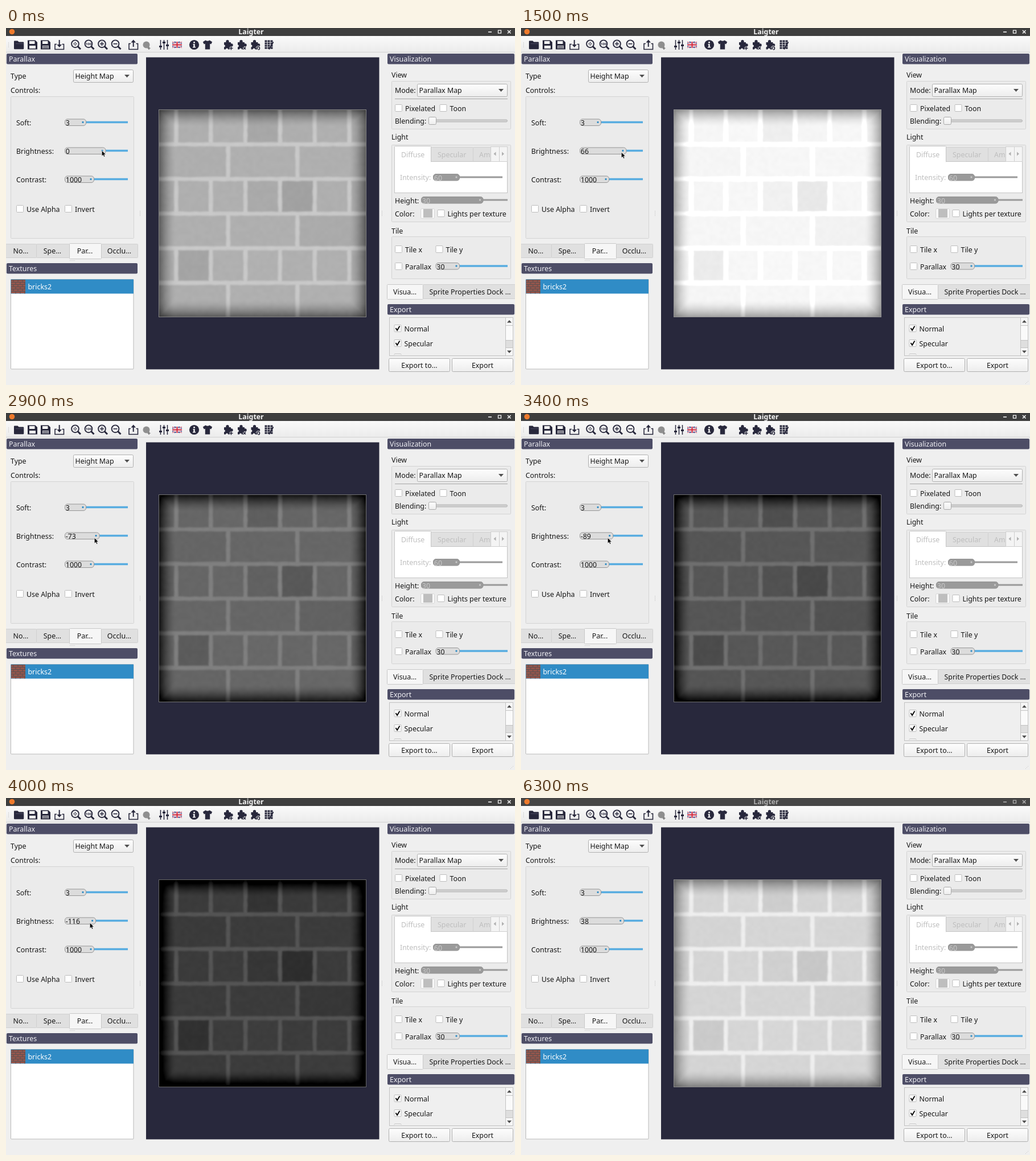
These frames come from a looping animation (894x627 px, 6.4 s). An HTML page with a canvas:

```html
<!DOCTYPE html>
<html lang="en">
<head>
<meta charset="utf-8">
<title>Laigter</title>
<style>
  html, body { margin: 0; width: 894px; height: 627px; overflow: hidden; background: #efefef; }
  body { position: relative; }
  svg, canvas { position: absolute; left: 0; top: 0; display: block; }
  #map { left: 268px; top: 143px; }
  text { font: 12.4px "Noto Sans", "Open Sans", sans-serif; white-space: pre; }
  .mid { text-anchor: middle; }
  .bold { font-weight: 700; }
  .tiny { font-size: 6px; }
</style>
</head>
<body>
<svg id="ui" width="894" height="627" viewBox="0 0 894 627"></svg>
<canvas id="map" width="365" height="365"></canvas>
<svg width="894" height="627" viewBox="0 0 894 627">
  <path id="cursor" d="M.3 .3V10L2.6 7.9L4.2 11.3L5.9 10.5L4.3 7.2H7.4Z" fill="#000" stroke="#fff" stroke-width=".6"/>
</svg>
<script>
const INK = '#28283c', TEXT = '#161616', BLUE = '#57ace0', GREY = '#9a9a9a', FADED = '#bebebe';
const out = [];
const add = s => out.push(s);

// Basic shapes, boxes given by their edges
const box = (x1, y1, x2, y2, fill, stroke, r = 0, extra = '') => {
  const k = stroke ? .5 : 0;
  add(`<rect x="${x1 + k}" y="${y1 + k}" width="${x2 - x1 - 2 * k}" height="${y2 - y1 - 2 * k}" rx="${r}" fill="${fill}" stroke="${stroke || 'none'}" ${extra}/>`);
};
const text = (x, y, s, fill = TEXT, extra = '') =>
  add(`<text x="${x}" y="${y}" fill="${fill}" ${extra}>${s}</text>`);
const mid = (x, y, s) => text(x, y, s, TEXT, 'class="mid"');
const fill = (d, c = INK) => add(`<path d="${d}" fill="${c}" fill-rule="evenodd"/>`);
const line = (d, c = INK, w = 1) => add(`<path d="${d}" fill="none" stroke="${c}" stroke-width="${w}"/>`);
const disc = (x, y, r, c = INK) => add(`<circle cx="${x}" cy="${y}" r="${r}" fill="${c}"/>`);

// Widgets
const dock = (x1, y1, x2, s) => {
  box(x1, y1, x2, y1 + 18.5, '#4d4d66', '', 2);
  text(x1 + 4, y1 + 14, s, '#f0f0f4');
};
const frame = (x1, y1, x2, y2) => box(x1, y1, x2, y2, '#ebebeb', '#d3d3d3', 1);
const combo = (x1, y1, x2, s) => {
  box(x1, y1, x2, y1 + 23, 'url(#btn)', '#b0b0b0', 2);
  text(x1 + 3.5, y1 + 16, s);
  fill(`M${x2 - 16} ${y1 + 9}h9l-4.5 5z`, '#505050');
};
const check = (x, y, s, on) => {
  box(x, y, x + 13, y + 13, '#fff', '#bdbdbd', 1);
  if (on) line(`M${x + 3} ${y + 6}l2.6 3.8L${x + 10} ${y + 2.5}`, '#111', 2);
  text(x + 18, y + 12, s);
};
const slider = (x1, xh, x2, y, s, off, id = '') => {
  line(`M${x1 + 8} ${y}H${x2}`, off ? GREY : BLUE, off ? 3 : 3.6);
  add(`<rect ${id && `id="${id}Grip"`} x="${x1 + .5}" y="${y - 5.5}" width="${xh - x1 - 1}" height="11.5" rx="4.5" fill="${off ? GREY : '#dcdcdc'}" stroke="${off ? '#919191' : '#969696'}"/>`);
  add(`<rect ${id && `id="${id}Dot"`} x="${xh - 7.5}" y="${y - 1.5}" width="3" height="3" rx="1" fill="${off ? '#c8c8c8' : '#2f8bc4'}"/>`);
  text(x1 + 1.8, y + 5.5, s, off ? '#c8c8c8' : TEXT, id && `id="${id}Text"`);
};
const tab = (x1, y1, x2, y2, on) => box(x1, y1, x2, y2, on ? '#f6f6f6' : '#e0e0e0', on ? '#c8c8c8' : '#d0d0d0', 1);
const button = (x1, x2, s) => {
  box(x1, 580, x2, 604, 'url(#btn)', '#b0b0b0', 2);
  mid((x1 + x2) / 2, 597, s);
};
const grip = (x, y, dx, dy) => {
  for (let i = 0; i < 5; i++) box(x + i * dx, y + i * dy, x + i * dx + 1, y + i * dy + 1, '#c6c6c6');
};

add(`<defs><linearGradient id="btn" x2="0" y2="1"><stop stop-color="#fdfdfd"/><stop offset="1" stop-color="#ededed"/></linearGradient>
<linearGradient id="bar" x2="0" y2="1"><stop stop-color="#fafafa"/><stop offset="1" stop-color="#ebebeb"/></linearGradient>
<clipPath id="list"><rect x="673" y="508" width="204" height="66"/></clipPath></defs>`);

// Title bar
box(0, 0, 894, 14, '#3e3e3e', '', 0, 'id="titleBar"');
disc(10.5, 6.5, 4.8, '#ee7a2c');
add('<g id="titleInk">');
text(430.5, 11, 'Laigter', '#f3f3f3', 'class="mid bold"');
line('M847 7H853', '#f3f3f3', 1.6);
line('M864.5 4.2h5v5h-5z', '#f3f3f3', 1.3);
line('M881 4l5.5 5.5M886.5 4l-5.5 5.5', '#f3f3f3', 1.6);
add('</g>');

// Toolbar
box(0, 14, 894, 43, 'url(#bar)');
box(0, 42, 894, 43, '#d2d2d2');
grip(4, 25, 0, 2);
fill('M14 23.500q0-1 1-1h5.500l2 2H30q1.300 0 1.300 1.300V36q0 1.200-1.300 1.200H15.300Q14 37.200 14 36z');
line('M17 27.600H31', '#55556a', .8);
const floppy = x => fill(`M${x} 21.500h13.500l3.500 3.500v12.500h-17zM${x + 3} 23v5h9.500v-5zM${x + 3} 31v5h11v-5z`);
floppy(38);
floppy(61);
fill('M64.500 32h10v1.200h-10zM64.500 34.200h10v1.200h-10z');
line('M89 28.500H86V37.500H101.500V28.500H98.500', INK, 1.6);
line('M93.700 21V30', INK, 2);
fill('M89.500 29h8.500l-4.250 5z');
const lens = (x, mark) => {
  add(`<circle cx="${x - 1.5}" cy="27.800" r="6.400" fill="none" stroke="${INK}" stroke-width="1.900"/>`);
  line(`M${x + 3} 32.300l5 5`, INK, 3);
  line(mark, INK, 1.6);
};
lens(123, 'M118.500 27.800h2M122.500 27.800h2M121.500 24.800v2M121.500 28.800v2');
lens(146.5, '');
text(145, 30, '100', INK, 'class="mid bold tiny"');
lens(170, 'M165 27.800h7M168.500 24.300v7');
lens(193.5, 'M188.500 27.800h7');
line('M219 27.500H216V37.500H231.500V27.500H228.500', INK, 1.6);
line('M223.700 33V24', INK, 2);
fill('M219.500 25.500h8.500l-4.250-5z');
disc(246.5, 29.5, 6, '#8f8f8f');
line('M251 33v5M248.500 35.500h5', '#777', 1.6);
line('M271.500 21V38M277.500 21V38M283.500 21V38', INK, 1.5);
line('M269 32.500h5M275 25.500h5M281 30.500h5', INK, 3);
box(292, 24, 309, 35, '#2b3f86');
line('M292 24l17 11M309 24l-17 11', '#fff', 2.4);
line('M292 24l17 11M309 24l-17 11', '#d0283c', .9);
line('M300.500 24v11M292 29.500h17', '#fff', 4);
line('M300.500 24v11M292 29.500h17', '#d0283c', 2.2);
disc(330.5, 29.5, 8.6);
disc(330.5, 25.3, 1.5, '#f4f4f4');
fill('M328.500 28h3.200v5h1.300v1.600h-5V33h1.300v-3.400h-.8z', '#f4f4f4');
fill('M350.500 21.500q3.500 2.600 7 0l4.700 3-2 4-2-.9V37.500h-8.400V27.600l-2 .9-2-4z');
const puzzle = (x, mark) => {
  box(x - 7, 25, x + 5, 37.5, INK, '', .5);
  disc(x - 1, 23.8, 2.7);
  disc(x + 6, 30, 2.7);
  disc(x - 7, 31.5, 1.9, '#f2f2f2');
  disc(x - 2, 37.3, 1.9, '#f0f0f0');
  line(mark, '#f0f0f0', 3.4);
  line(mark, INK, 1.6);
};
puzzle(390, 'M395.500 32.500v6M392.500 35.500h6');
puzzle(414, 'M417 33.500l4 4M421 33.500l-4 4');
puzzle(437.5, 'M440.500 35.500a2.500 2.500 0 1 1 2.500 2.500');
for (let r = 0; r < 4; r++)
  for (let c = 0; c < 3; c++) box(454.5 + c * 5, 21.5 + r * 4, 458.5 + c * 5, 24.7 + r * 4, INK);
line('M462 37.500l7.500-13', INK, 2);

// Left side
dock(1, 45, 231, 'Parallax');
text(8, 89, 'Type');
combo(118, 73, 224, 'Height Map');
text(8, 114, 'Controls:');
frame(8, 120, 225, 370);
text(18, 171, 'Soft:');
slider(103, 141, 214, 165.5, '3');
text(18, 221, 'Brightness:');
slider(103, 175, 214, 215.5, '0', false, 'bright');
text(18, 271, 'Contrast:');
slider(103, 155, 214, 265.5, '1000');
check(18, 311, 'Use Alpha');
check(103, 311, 'Invert');
tab(-1, 379, 54, 404);
tab(53, 379, 112, 404);
tab(167, 379, 232, 404);
tab(111, 378, 168, 406, true);
[[26, 'No...'], [81.5, 'Spe...'], [138.5, 'Par...'], [199, 'Occlu...']].forEach(([x, s]) => mid(x, 396, s));
grip(112, 408, 2, 0);
dock(1, 413, 231, 'Textures');
box(8, 441, 224.5, 599.5, '#fff', '#b9b9b9', 1);
box(8.5, 441.5, 224, 466.5, '#308cc6');
box(9, 442, 34, 466, '#94564c');
for (let r = 0; r < 6; r++) {
  const y = 442.5 + r * 4;
  line(`M9 ${y}H34M${13 + r % 2 * 4} ${y}v4m8-4v4m8-4v4`, '#5f5050', 1.1);
}
text(38.5, 459, 'bricks2', '#fff');
grip(235, 321, 0, 2);

// Viewport
box(246, 51.5, 655.5, 599.5, INK);
grip(660, 321, 0, 2);

// Right side
dock(670, 45, 893, 'Visualization');
text(677, 87, 'View');
frame(677, 93, 887, 178);
text(683, 114, 'Mode:');
combo(722, 98, 881, 'Parallax Map');
box(683, 124, 881, 125, '#a5a5a5');
check(683, 134, 'Pixelated');
check(761.5, 134, 'Toon');
text(683, 168, 'Blending:');
box(745, 160.5, 881, 165.5, '#d0d0d0', '#b5b5b5', 2);
box(742, 156, 756, 170, 'url(#btn)', '#a9a9a9', 2);
text(677, 196, 'Light');
frame(677, 205, 887, 341);
tab(746, 209, 821, 235);
tab(820, 209, 852, 235);
box(682, 234, 881, 290, '#fff', '#c4c4c4');
box(682, 207, 747, 236, '#fff', '#c4c4c4', 1);
box(683, 233, 746, 237, '#fff');
text(694, 227, 'Diffuse', FADED);
text(758, 227, 'Specular', FADED);
text(831, 227, 'Am', FADED);
box(851, 208, 867, 235, '#f4f4f4', '#cecece');
box(866, 208, 881, 235, '#f4f4f4', '#cecece');
fill('M860.500 217.500v7l-4-3.500zM871 217.500v7l4-3.500z', '#b0b0b0');
text(692, 267, 'Intensity:', FADED);
slider(750, 797, 872, 262, '60', true);
text(683, 308, 'Height:');
slider(729, 838.5, 881, 302, '30', true);
text(683, 331, 'Color:');
box(728, 317, 753, 335, '#f8f8f8', '#d6d6d6', 2);
box(733, 318, 749, 333, FADED);
check(757.5, 319, 'Lights per texture');
text(677, 361, 'Tile');
frame(677, 366, 887, 441);
check(683, 382, 'Tile x');
check(754.5, 382, 'Tile y');
check(683, 412, 'Parallax');
slider(754.5, 797, 881, 418, '30');
tab(732, 450, 895, 476);
tab(669, 450, 733, 477, true);
text(680, 468, 'Visua...');
text(743.5, 468, 'Sprite Properties Dock ...');
dock(670, 485, 893, 'Export');
box(673, 508, 891, 576, '#efefef', '#c2c2c2');
add('<g clip-path="url(#list)">');
check(681.5, 521, 'Normal', true);
check(681.5, 547, 'Specular', true);
check(681.5, 572, 'Occlusion', true);
add('</g>');
box(877, 508, 891, 576, '#dedede', '#c2c2c2');
box(877, 508, 891, 523, '#f6f6f6', '#c2c2c2');
box(877, 522, 891, 549, '#fafafa', '#c2c2c2');
box(877, 561, 891, 576, '#f6f6f6', '#c2c2c2');
fill('M880 517.500h8l-4-4.500zM880 566.500h8l-4 4.500z', '#4a4a4a');
button(672, 780, 'Export to...');
button(783, 891, 'Export');
for (let i = 0; i < 3; i++) box(890 - i * 2, 620 + i * 2, 891 - i * 2, 621 + i * 2, '#c9c9c9');

const $ = id => document.getElementById(id);
$('ui').innerHTML = out.join('');

// Height map of the brick wall
const SIZE = 365, ROW = SIZE / 6;
const hash = (x, y) => { const s = Math.sin(x * 127.1 + y * 311.7) * 43758.5453; return s - Math.floor(s); };
const mix = (a, b, k) => a + (b - a) * k;
const smooth = (a, b, v) => { const k = Math.min(1, Math.max(0, (v - a) / (b - a))); return k * k * (3 - 2 * k); };
const noise = (x, y) => {
  const i = Math.floor(x), j = Math.floor(y), u = x - i;
  return mix(mix(hash(i, j), hash(i + 1, j), u), mix(hash(i, j + 1), hash(i + 1, j + 1), u), y - j) - .5;
};
const darker = { '0,3': 7, '2,3': 6, '2,4': 14, '3,2': 6, '4,1': 12 };
const bevel = d => Math.max(0, 1 - d / 30) ** 1.6;
const joint = (v, step) => Math.abs(v - Math.round(v / step) * step);

function height(x, y) {
  const row = Math.floor(y / ROW), wide = row % 2;
  const w = wide ? 2 * ROW : ROW, shift = wide ? 0 : ROW / 2;
  const col = Math.floor((x + shift) / w);
  // the outer border carries no mortar
  const dy = y < ROW / 2 || y > SIZE - ROW / 2 ? 99 : joint(y, ROW);
  const dx = wide && (x < ROW || x > SIZE - ROW) ? 99 : joint(x + shift, w);
  const round = Math.max(0, 6 - Math.max(dx, dy)) * .25;
  const d = Math.min(dx, dy) - round + noise(x / 9, y / 9) * 1.2;
  const tone = 177 - hash(row + 3, col + 7) * 3 - (darker[row + ',' + col] || 0);
  const v = mix(200, tone, smooth(.8, 6.4, d)) + noise(x / 6 + 40, y / 6) * 4;
  const ex = bevel(Math.min(x, SIZE - 1 - x)), ey = bevel(Math.min(y, SIZE - 1 - y));
  return v - 86 * (Math.max(ex, ey) + .45 * Math.min(ex, ey));
}

const wall = new Float32Array(SIZE * SIZE);
for (let i = 0; i < wall.length; i++) wall[i] = height(i % SIZE, Math.floor(i / SIZE));
const ctx = $('map').getContext('2d');
const image = ctx.createImageData(SIZE, SIZE);

function paintWall(level) {
  const px = image.data;
  for (let i = 0; i < wall.length; i++) {
    const x = i % SIZE, y = (i - x) / SIZE;
    const rim = x === 0 || y === 0 || x === SIZE - 1 || y === SIZE - 1;
    px[4 * i] = px[4 * i + 1] = px[4 * i + 2] = rim ? 132 + level * .25 : wall[i] + level;
    px[4 * i + 3] = 255;
  }
  ctx.putImageData(image, 0, 0);
}

// Tracks of [ms, value]
const LOOP = 6400, STEP = 100, LEAVE = 5600, BLUR = 6300;
const value = [[600, 0], [700, 15], [800, 29], [1300, 70], [1500, 66], [1800, 42], [2000, 15], [2400, -64],
  [2800, -64], [2900, -73], [3000, -73], [3500, -93], [3600, -93], [3700, -100], [4000, -116],
  [4100, -116], [4800, 24], [4900, 24], [5000, 33], [5100, 38]];
const lift = [[1300, 0], [1800, 13], [2100, 0]];
const cursorY = [[200, 215], [300, 216], [600, 216], [800, 216], [1800, 219], [4100, 219], [4800, 222],
  [5500, 222], [5700, 175], [5900, 90], [6100, 15], [6200, 0]];
const exitX = [[5500, 173.5], [5700, 155], [5900, 108], [6100, 58], [6200, 65]];

function at(track, t) {
  const i = track.findIndex(k => k[0] >= t);
  if (i < 0) return track[track.length - 1][1];
  if (i === 0) return track[0][1];
  const [t0, a] = track[i - 1], [t1, b] = track[i];
  return mix(a, b, (t - t0) / (t1 - t0));
}

let shown = -1;
function draw(t) {
  if (t === shown) return;
  shown = t;
  const v = Math.round(at(value, t));
  const right = 174.5 + v * .15;
  $('brightText').textContent = v;
  $('brightGrip').setAttribute('width', right - 103);
  $('brightDot').setAttribute('x', right - 7);
  const x = t < LEAVE ? 168.3 + v * (v < 0 ? .18 : .12) : at(exitX, t);
  $('cursor').setAttribute('transform', `translate(${Math.round(x)} ${Math.round(at(cursorY, t))})`);
  const idle = t >= BLUR;
  $('cursor').style.display = idle ? 'none' : '';
  $('titleBar').setAttribute('fill', idle ? '#464646' : '#3e3e3e');
  $('titleInk').setAttribute('opacity', idle ? .6 : 1);
  paintWall(v + at(lift, t));
}

const start = performance.now();
function tick() {
  const t = (performance.now() - start) % LOOP;
  draw(Math.floor(t / STEP) * STEP);
  requestAnimationFrame(tick);
}
tick();
</script>
</body>
</html>
```
